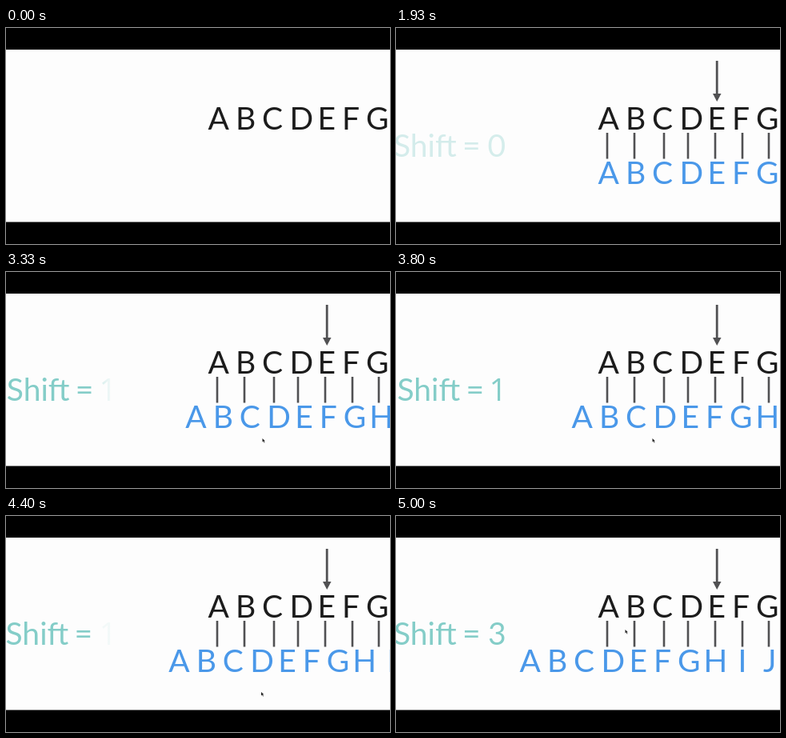
An HTML page with a canvas for the animation above (5070 ms loop, 480x270 px).

```html
<!DOCTYPE html>
<html lang="en">
<head>
<meta charset="utf-8">
<title>Alphabet shift</title>
<style>
  html, body { margin: 0; width: 100%; height: 100%; overflow: hidden; background: #000; }
  canvas { display: block; width: 100vw; height: 100vh; }
</style>
</head>
<body>
<canvas id="stage" width="480" height="270"></canvas>
<script>
const ctx = document.getElementById('stage').getContext('2d');
const LOOP = 5070, FPS = 15;
const INK = '#1c1c1c', LINE = '#515153', BLUE = '#4a98e9', TEAL = [132, 205, 200];
const MAIN_FONT = '39px Lato, sans-serif';
const ONE_FONT = '39px "Open Sans", sans-serif';

// Glyph centres relative to the first letter
const SPACING = [0, 34.5, 67.5, 104, 135.5, 166, 198, 231.5, 265, 298];
const TICKS = [264, 298, 335, 365, 399, 433, 466];

// Row and label positions for each shift; slide and fade are start times
const SHIFTS = [
  { row: 266, label: 0, digit: 126 },
  { row: 233, label: 4.5, digit: 125, slide: 3067, fade: 3260, fadeTime: 300 },
  { row: 196, label: 0, digit: 126, slide: 4240, fade: 4400, fadeTime: 300 },
  { row: 167, label: 0, digit: 126, slide: 4690, fade: 4760, fadeTime: 240 }
];
const SLIDE_TIME = 350;

const clamp = v => Math.min(1, Math.max(0, v));
const progress = (t, start, duration) => clamp((t - start) / duration);
const smooth = p => p * p * (3 - 2 * p);
const mix = (a, b, p) => a + (b - a) * p;
const teal = alpha => `rgba(${TEAL},${alpha})`;

function rect(color, x, y, w, h) {
  ctx.fillStyle = color;
  ctx.fillRect(x, y, w, h);
}

function centred(text, x, y) {
  const m = ctx.measureText(text);
  ctx.fillText(text, x - (m.actualBoundingBoxRight - m.actualBoundingBoxLeft) / 2, y);
}

function drawRow(x, y, count, color) {
  ctx.font = MAIN_FONT;
  ctx.fillStyle = color;
  for (let i = 0; i < count; i++) {
    centred(String.fromCharCode(65 + i), x + SPACING[i], y);
  }
}

function drawArrow(p) {
  if (p <= 0) return;
  const tip = mix(41, 92, p);
  const neck = Math.max(41, tip - 10);
  rect(LINE, 399.8, 41, 2.8, neck - 41);
  ctx.beginPath();
  ctx.moveTo(396, neck);
  ctx.lineTo(406.5, neck);
  ctx.lineTo(401.2, tip);
  ctx.fill();
}

// A digit appears with a soft wipe from left to right
function drawDigit(n, wipe, alpha) {
  if (wipe <= 0 || alpha <= 0) return;
  const x = SHIFTS[n].digit;
  const fill = ctx.createLinearGradient(x - 11, 0, x + 11, 0);
  fill.addColorStop(0, teal(alpha * clamp(1.6 * wipe)));
  fill.addColorStop(1, teal(alpha * clamp(1.6 * wipe - 0.6)));
  ctx.font = n === 1 ? ONE_FONT : MAIN_FONT;
  ctx.fillStyle = fill;
  centred(String(n), x, 161);
}

function drawLabel(t, offset) {
  const shown = progress(t, 1870, 190);
  ctx.font = MAIN_FONT;
  ctx.fillStyle = teal(shown);
  ctx.fillText('Shift', -3 + offset, 161);
  centred('=', 94 + offset, 161);
  SHIFTS.forEach((s, n) => {
    const next = SHIFTS[n + 1];
    const wipe = n ? progress(t, s.fade, s.fadeTime) : 1;
    const left = next ? 1 - clamp(2 * progress(t, next.slide, SLIDE_TIME)) : 1;
    drawDigit(n, wipe, n ? left : left * shown);
  });
}

function cursorAt(t) {
  if (t < 2530 || (t > 4540 && t < 4720)) return null;
  if (t < 4190) {
    const p = smooth(progress(t, 2500, 460));
    return [mix(335, 320.5, p), mix(190, 208, p)];
  }
  if (t < 4720) return [319, mix(214, 220, progress(t, 4190, 70))];
  const p = smooth(progress(t, 4730, 265));
  return [mix(312, 286.5, p), mix(227, 142, p)];
}

function drawCursor(t) {
  const at = cursorAt(t);
  if (!at) return;
  const [x, y] = at;
  ctx.fillStyle = '#222';
  ctx.beginPath();
  ctx.moveTo(x, y);
  ctx.lineTo(x, y + 4.5);
  ctx.lineTo(x + 1.2, y + 3.6);
  ctx.lineTo(x + 2.2, y + 5.6);
  ctx.lineTo(x + 2.9, y + 5.2);
  ctx.lineTo(x + 2, y + 3.3);
  ctx.lineTo(x + 3.4, y + 3.2);
  ctx.fill();
}

function draw(t) {
  let row = SHIFTS[0].row, label = SHIFTS[0].label;
  for (const s of SHIFTS.slice(1)) {
    const p = smooth(progress(t, s.slide, SLIDE_TIME));
    row = mix(row, s.row, p);
    label = mix(label, s.label, p);
  }

  rect('#000', 0, 0, 480, 270);
  rect('#fdfdfd', 0, 27, 480, 215.5);
  drawRow(266, 126.5, 7, INK);
  drawArrow(smooth(progress(t, 290, 510)));
  if (t >= 1199) {
    for (const x of TICKS) rect(LINE, x - 1.3, 131, 2.6, 32.5);
    ctx.globalAlpha = progress(t, 1200, 330);
    drawRow(row, 195, SPACING.length, BLUE);
    ctx.globalAlpha = 1;
  }
  drawLabel(t, label);
  drawCursor(t);
}

const origin = performance.now();
function tick() {
  const t = (performance.now() - origin) % LOOP;
  draw(Math.floor((t + 4) * FPS / 1000) * 1000 / FPS);
  requestAnimationFrame(tick);
}
tick();
</script>
</body>
</html>
```
